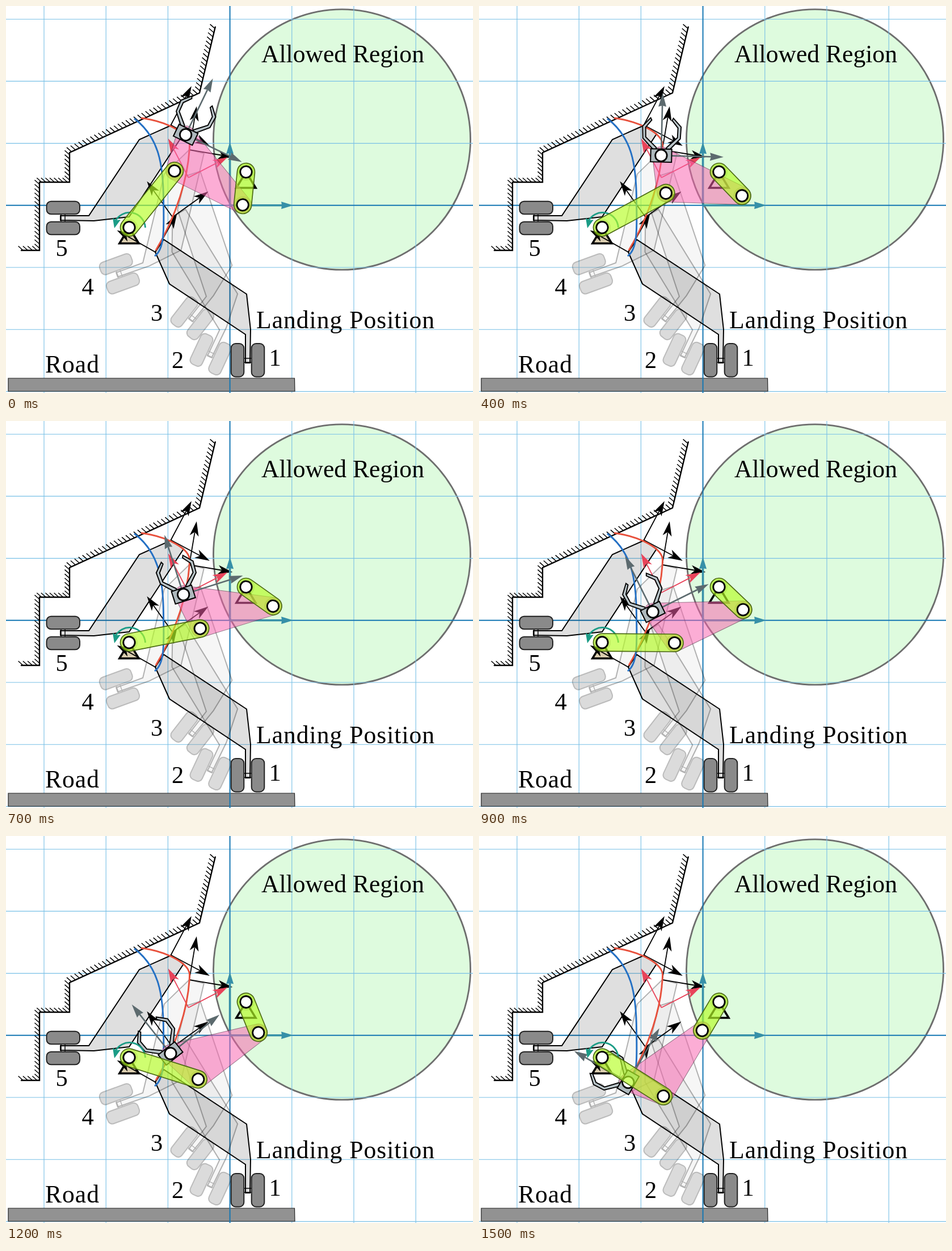
Recreate the animation shown at these times as an HTML page. Size 823x681 px, loop 1.6 s.

```html
<!DOCTYPE html>
<html lang="en">
<head>
<meta charset="utf-8">
<title>Landing gear linkage</title>
<style>
  html, body { margin: 0; width: 100%; height: 100%; overflow: hidden; background: #fff; }
  svg { display: block; width: 100vw; height: 100vh; }
  text { font-family: "Liberation Serif", "Times New Roman", serif; font-size: 43.6px; fill: #000; }
  .digit { font-size: 42.5px; text-anchor: middle; }
</style>
</head>
<body>
<svg id="stage" viewBox="0 0 823 681" preserveAspectRatio="none"></svg>
<script>
const NS = "http://www.w3.org/2000/svg";
const stage = document.getElementById("stage");

function add(parent, tag, attrs, text) {
  const el = document.createElementNS(NS, tag);
  for (const k in attrs) el.setAttribute(k, attrs[k]);
  if (text) el.textContent = text;
  parent.appendChild(el);
  return el;
}
const group = (parent, attrs) => add(parent, "g", attrs || {});
const path = (parent, d, stroke, width, fill) =>
  add(parent, "path", { d, stroke: stroke || "none", "stroke-width": width || 0, fill: fill || "none" });

// Arrow along +x from the local origin
function arrow(parent, angle, len, color, width, head, half, notch) {
  const g = group(parent, { transform: `rotate(${angle})` });
  path(g, `M0 0H${len - head + notch}`, color, width);
  path(g, `M${len} 0L${len - head} ${half}L${len - head + notch} 0L${len - head} ${-half}Z`, "", 0, color);
}
function axes(parent, len, color, width, head, half, notch) {
  arrow(parent, 0, len, color, width, head, half, notch);
  arrow(parent, -90, len, color, width, head, half, notch);
}
function pose(x, y, angle, color) {
  const g = group(stage, { transform: `translate(${x} ${y}) rotate(${angle})` });
  axes(g, 77.5, color, 1.8, 26, 8, 7);
}

// ---- Backdrop ----
add(stage, "ellipse", { cx: 592, cy: 235, rx: 226.5, ry: 229.2, fill: "#defbde", stroke: "#6e6e6e", "stroke-width": 2.8 });
const O = { x: 394.6, y: 350.8 }, CELL = 109.2;
for (let i = -3; i <= 3; i++) {
  if (!i) continue;
  path(stage, `M${O.x + i * CELL} 0V681M0 ${O.y + i * CELL}H823`, "#78c0e6", 1.1);
}
path(stage, "M4 655H508.5L509 678H4Z", "#222", 1.2, "#929292");
path(stage, `M${O.x} 0V681M0 ${O.y}H823`, "#1577b3", 2);

// ---- Airframe outline with hatching ----
const frame = [[369, 36], [341, 153], [112, 258], [112, 310], [59, 310], [59, 430], [26, 430]];
let hatch = "";
for (let i = 1; i < frame.length; i++) {
  const [x0, y0] = frame[i - 1], [x1, y1] = frame[i];
  const n = Math.round(Math.hypot(x1 - x0, y1 - y0) / 7.6);
  for (let j = 0; j < n; j++) {
    const s = (j + 0.5) / n;
    hatch += `M${x0 + (x1 - x0) * s} ${y0 + (y1 - y0) * s}l-8.5 -7.5`;
  }
}
path(stage, hatch, "#000", 1.5);
path(stage, "M" + frame.join("L"), "#000", 2.4);

// ---- Landing gear, drawn in its lowered place and carried to each pose ----
const PIVOT = [263, 433];
function gear(x, y, turn, opacity) {
  const g = group(stage, {
    transform: `translate(${x} ${y}) rotate(${turn}) translate(${-PIVOT[0]} ${-PIVOT[1]})`, opacity
  });
  path(g, "M422 628V578L288 489L263 433L278 411L424 507L431 569L430 628Z", "#000", 2, "rgba(0,0,0,.125)");
  path(g, "M419 620H433V627H419Z", "#000", 1.4);
  for (const cx of [408, 444])
    add(g, "rect", { x: cx - 11.3, y: 594, width: 22.6, height: 58.5, rx: 8, fill: "#8a8a8a", stroke: "#222", "stroke-width": 2 });
}
gear(323, 253, 70, 0.3);
gear(317, 299, 38, 0.3);
gear(293.5, 371.5, 25, 0.3);
gear(263, 433, 0, 1);
gear(291, 210, 90, 1);

// ---- Linkage dimensions and supports ----
const A = { x: 217, y: 389.7 }, B = { x: 423, y: 292 };
const CRANK = 127.6, ROCKER = 58.3, COUPLER = 134.2, R = 15.5;
const TIP = { x: -10.7, y: -65.8 };
const START = -0.8936, SWEEP = 1.456;

const support = (p, fill) =>
  path(stage, `M${p.x} ${p.y}L${p.x - 17} ${p.y + 28}H${p.x + 17}Z`, "#000", 3.6, fill);
support(A, "#d9ccae");
support(B, "none");

// ---- Target poses and world axes ----
pose(290.5, 209.5, 28, "#000");
pose(323, 253, 9.6, "#000");
pose(293.5, 371.5, -35.6, "#000");
pose(263, 433, -60.4, "#000");
pose(321.5, 302, -27.4, "#e8435a");
axes(group(stage, { transform: `translate(${O.x} ${O.y})` }), 111.5, "#3690a8", 3.6, 21, 6.5, 1);

// ---- Traced curves ----
path(stage, "M238 197C288 204 324 226 323.5 245C322 300 300 370 264 430", "#e8503c", 2.9);
path(stage, "M226 198C270 231 277 280 277.5 340C278 385 281 427 262 440", "#2470c4", 2.9);

// ---- Labels ----
add(stage, "text", { x: 450, y: 99 }, "Allowed Region");
add(stage, "text", { x: 441, y: 567, "letter-spacing": 1 }, "Landing Position");
add(stage, "text", { x: 69, y: 645, "letter-spacing": 1 }, "Road");
[[474, 633], [302.5, 637], [265.5, 554], [144, 508], [98, 440]].forEach(([x, y], i) =>
  add(stage, "text", { x, y, class: "digit" }, String(i + 1)));

// ---- Moving parts ----
// Triangle grown by radius r with round corners
function roundHull(pts, r) {
  let d = "";
  const n = pts.length;
  for (let i = 0; i <= n; i++) {
    const p = pts[i % n], q = pts[(i + 1) % n];
    const len = Math.hypot(q.x - p.x, q.y - p.y);
    const nx = (q.y - p.y) / len * r, ny = (p.x - q.x) / len * r;
    d += (i ? `A${r} ${r} 0 0 1 ` : "M") + `${p.x + nx} ${p.y + ny}`;
    d += i < n ? `L${q.x + nx} ${q.y + ny}` : "Z";
  }
  return d;
}
const coupler = group(stage);
path(coupler, roundHull([{ x: 0, y: 0 }, TIP, { x: COUPLER, y: 0 }], R),
  "rgba(70,40,60,.55)", 1, "rgba(250,98,174,.52)");

const hand = group(coupler, { transform: `translate(${TIP.x} ${TIP.y}) rotate(-.6)` });
axes(hand, 110, "#5c6a6e", 2.6, 24, 7, 2);
for (const side of [1, -1])
  path(group(hand, { transform: `scale(${side} 1)` }),
    "M-15 -11L-33 -30L-34 -51L-20 -66L-18 -62L-28.5 -49L-28 -32L-9 -14V-11Z", "#000", 1.9, "#b9c4c8");
add(hand, "rect", { x: -18.5, y: -11.5, width: 37, height: 23, fill: "#aeb9bd", stroke: "#000", "stroke-width": 2 });
const joint = (parent, x) =>
  add(parent, "circle", { cx: x, cy: 0, r: 10.2, fill: "#fff", stroke: "#000", "stroke-width": 2.8 });
joint(hand, 0);

path(stage, "M245.5 390A28 28 0 0 0 192 380", "#1b9c86", 2.8);
path(stage, "M191 391L188 373L195 377L202 376Z", "", 0, "#1b9c86");

function bar(len) {
  const g = group(stage);
  path(g, `M0 ${-R}H${len}A${R} ${R} 0 0 1 ${len} ${R}H0A${R} ${R} 0 0 1 0 ${-R}Z`,
    "#4c6a14", 1.7, "rgba(182,254,38,.66)");
  for (const x of [0, len]) {
    add(g, "circle", { cx: x, cy: 0, r: R - 0.5, fill: "rgba(110,150,0,.14)" });
    joint(g, x);
  }
  return g;
}
const crank = bar(CRANK), rocker = bar(ROCKER);

function place(el, from, to) {
  const deg = Math.atan2(to.y - from.y, to.x - from.x) * 180 / Math.PI;
  el.setAttribute("transform", `translate(${from.x} ${from.y}) rotate(${deg})`);
}

// The crank advances 0.1 rad every 100 ms and stops at the locked position
function draw(ms) {
  const step = Math.floor((ms % 1600) / 100);
  const a = START + Math.min(step * 0.1, SWEEP);
  const P = { x: A.x + CRANK * Math.cos(a), y: A.y + CRANK * Math.sin(a) };
  const dx = B.x - P.x, dy = B.y - P.y, d = Math.hypot(dx, dy);
  const ux = dx / d, uy = dy / d;
  const along = Math.min(COUPLER, (d * d + COUPLER ** 2 - ROCKER ** 2) / (2 * d));
  const off = Math.sqrt(COUPLER ** 2 - along ** 2);
  const Q = { x: P.x + along * ux - off * uy, y: P.y + along * uy + off * ux };
  place(crank, A, P);
  place(rocker, B, Q);
  place(coupler, P, Q);
}

let begin = null;
function tick(now) {
  if (begin === null) begin = now;
  draw(now - begin);
  requestAnimationFrame(tick);
}
draw(0);
requestAnimationFrame(tick);
</script>
</body>
</html>
```
